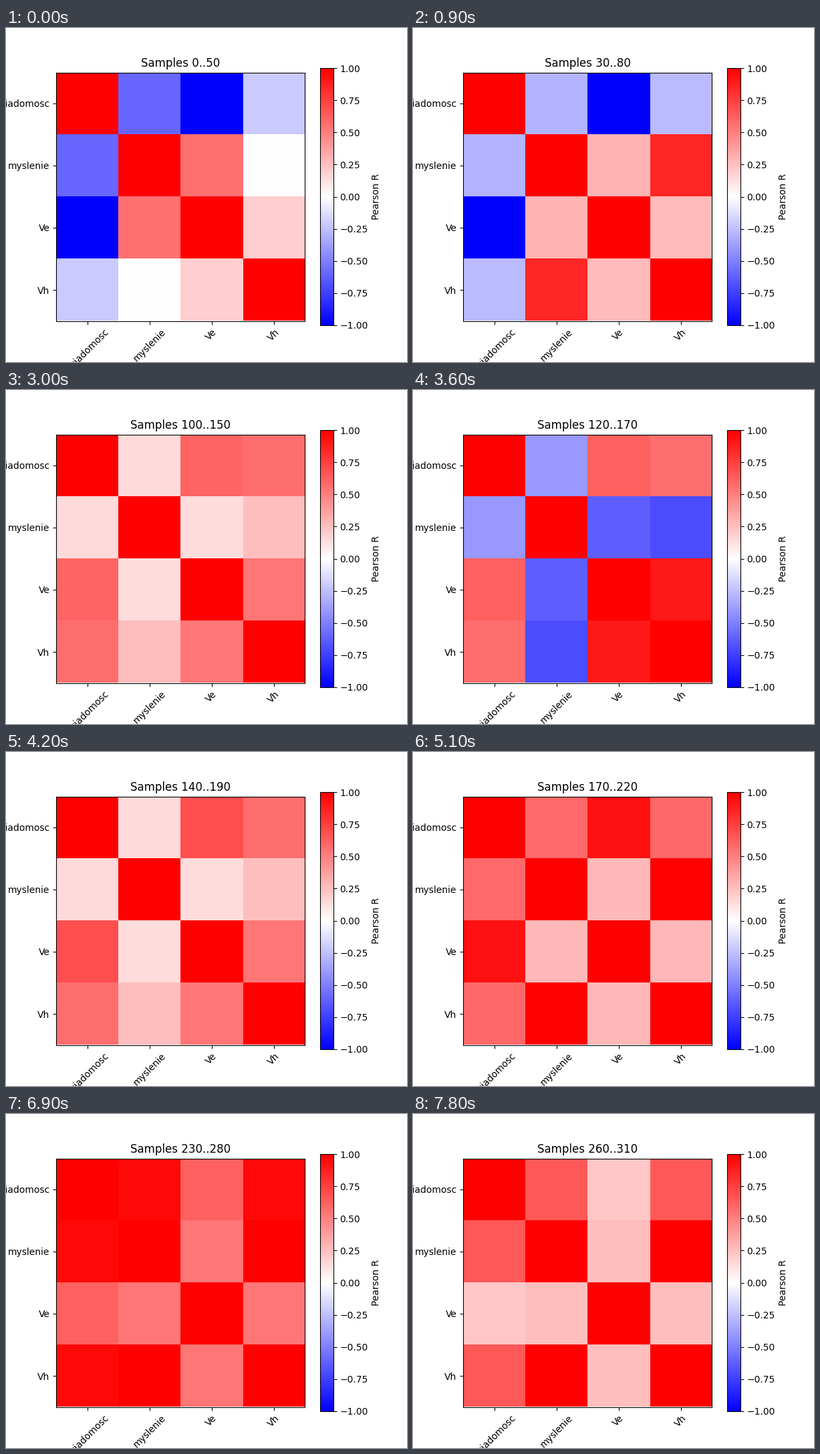
Recreate the animation shown at these times as a matplotlib script. Size 600 by 500 pixels, loop 8000 ms.

```python
import numpy as np
import matplotlib.pyplot as plt
from matplotlib.animation import FuncAnimation

plt.rcParams["font.family"] = "DejaVu Sans"

LABELS = ["swiadomosc", "myslenie", "Ve", "Vh"]
WINDOW, STRIDE = 50, 10
TICK_MS, TICKS_PER_STEP, TICKS = 100, 3, 80


def bump(x, center, width=22):
    return np.exp(-((x - center) / width) ** 2)


def ease(x, begin, end):
    t = np.clip((x - begin) / (end - begin), 0, 1)
    return t * t * (3 - 2 * t)


def correlation(start):
    """Two loosely coupled pairs of signals: (0, 2) and (1, 3)."""
    opening = bump(start, 0)
    reversal = bump(start, 120)

    # How strongly each signal follows the rhythm shared by both pairs
    awareness = -0.6 + 1.17 * ease(start, 10, 70) + 0.42 * bump(start, 222, 30)
    thinking = 1 - 1.7 * reversal
    ve = 0.25 + 0.3 * opening + 0.65 * (reversal + bump(start, 210))
    vh = 1 - 0.65 * opening
    loads = np.array([awareness, thinking, ve, vh])

    matrix = np.outer(loads, loads)
    matrix[0, 2] = matrix[2, 0] = (-1 + 1.6 * ease(start, 30, 70)
                                   + 0.43 * bump(start, 190, 40)
                                   - 0.4 * ease(start, 210, 260))
    matrix[1, 3] = matrix[3, 1] = thinking - opening
    np.fill_diagonal(matrix, 1)
    return matrix


fig, ax = plt.subplots(figsize=(6, 5), dpi=100)
image = ax.imshow(correlation(0), cmap="bwr", vmin=-1, vmax=1)
ax.set_xticks(range(len(LABELS)), LABELS, rotation=45)
ax.set_yticks(range(len(LABELS)), LABELS)
title = ax.set_title("")
fig.colorbar(image, ax=ax, label="Pearson R")


def update(tick):
    start = tick // TICKS_PER_STEP * STRIDE
    image.set_data(correlation(start))
    title.set_text(f"Samples {start}..{start + WINDOW}")
    return image, title


anim = FuncAnimation(fig, update, frames=TICKS, interval=TICK_MS,
                     repeat=True, repeat_delay=0)
plt.show()
```
